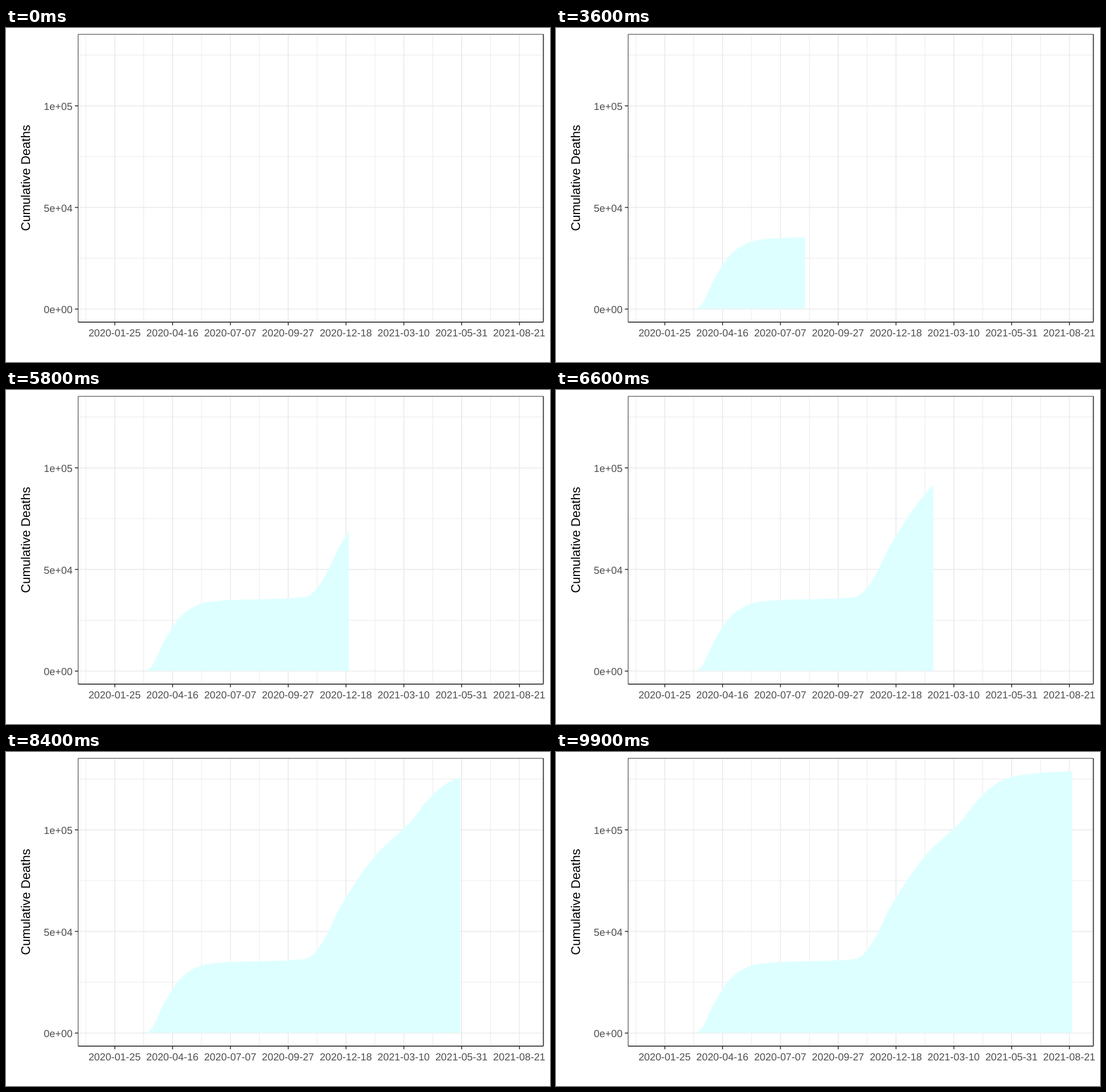
An HTML page for the animation above (10 s loop, 954x587 px).

```html
<!DOCTYPE html>
<html lang="en">
<head>
<meta charset="utf-8">
<title>Cumulative Deaths</title>
<style>
  html, body { margin: 0; width: 100%; height: 100%; overflow: hidden; background: #fff; }
  svg { display: block; width: 100%; height: 100%; }
  text {
    font-family: "Liberation Sans", Arial, sans-serif;
    font-size: 17.9px;
    fill: #4d4d4d;
    text-rendering: geometricPrecision;
  }
  .title { font-size: 22.1px; fill: #000; text-anchor: middle; }
  .major { stroke: #ebebeb; stroke-width: 1.7; }
  .minor { stroke: #ebebeb; stroke-width: 1; }
  .tick { stroke: #333; stroke-width: 1.6; }
  .thin { stroke: #333; stroke-width: 1; }
  .thick { stroke: #333; stroke-width: 1.7; }
  .area { fill: #deffff; }
</style>
</head>
<body>
<svg id="chart" viewBox="0 0 954 587"></svg>
<script>
const LOOP = 10000, STEP = 100, HOLD = 1100;
const LAST_DAY = 600, LAST_STEP = 99;
const box = { left: 126.5, top: 11.1, right: 942.4, bottom: 516.8 };

// Key points of the curve: day, total in hundreds
const keys = [
  [58, 0], [72, 14], [93, 154], [114, 264], [135, 318], [170, 346], [191, 350],
  [254, 356], [275, 360], [303, 386], [324, 493], [338, 595], [359, 716],
  [394, 883], [422, 975], [443, 1046], [464, 1139], [492, 1227], [520, 1265],
  [548, 1278], [600, 1288]
];

const xOf = day => 163.6 + day * 1.2363;
const yOf = hundreds => 494 - hundreds * 0.3572;

const rise = i => (keys[i + 1][1] - keys[i][1]) / (keys[i + 1][0] - keys[i][0]);

// Slope at a key: that of the parabola through it and its neighbours
function slope(i) {
  if (i === 0) return 0;
  if (i === keys.length - 1) return rise(i - 1);
  const before = keys[i][0] - keys[i - 1][0];
  const after = keys[i + 1][0] - keys[i][0];
  return (rise(i - 1) * after + rise(i) * before) / (before + after);
}

// Cubic Hermite curve through the keys
function valueAt(day) {
  let i = 0;
  while (i < keys.length - 2 && day >= keys[i + 1][0]) i++;
  const [x0, y0] = keys[i], [x1, y1] = keys[i + 1];
  const w = x1 - x0, u = (day - x0) / w, v = 1 - u;
  return y0 * v * v * (1 + 2 * u) + y1 * u * u * (1 + 2 * v)
    + w * u * v * (v * slope(i) - u * slope(i + 1));
}

const svg = document.getElementById("chart");

function add(tag, attrs, text) {
  const el = document.createElementNS("http://www.w3.org/2000/svg", tag);
  for (const name in attrs) el.setAttribute(name, attrs[name]);
  if (text) el.textContent = text;
  svg.appendChild(el);
  return el;
}

const line = (cls, x1, y1, x2, y2) => add("line", { class: cls, x1, y1, x2, y2 });
const vLine = (cls, x) => line(cls, x, box.top, x, box.bottom);
const hLine = (cls, y) => line(cls, box.left, y, box.right, y);

const xTicks = Array.from({ length: 8 }, (_, i) => 22 + 82 * i);
const yTicks = [[0, "0e+00"], [500, "5e+04"], [1000, "1e+05"]];

for (const day of xTicks) vLine("minor", xOf(day - 41));
for (const [v] of yTicks) hLine("minor", yOf(v + 250));
for (const day of xTicks) vLine("major", xOf(day));
for (const [v] of yTicks) hLine("major", yOf(v));

const area = add("path", { class: "area" });

vLine("thin", box.left);
hLine("thin", box.top);
vLine("thick", box.right);
hLine("thick", box.bottom);

for (const day of xTicks) {
  const x = xOf(day);
  const date = new Date(Date.UTC(2020, 0, 3 + day)).toISOString().slice(0, 10);
  line("tick", x, box.bottom, x, 522.4);
  add("text", { x: x - 0.4, y: 542.3, "text-anchor": "middle" }, date);
}
for (const [v, label] of yTicks) {
  const y = yOf(v);
  line("tick", 120.8, y, box.left, y);
  add("text", { x: 116.6, y: y + 7.4, "text-anchor": "end" }, label);
}
add("text", { class: "title", transform: "translate(41.6 263.5) rotate(-90)" }, "Cumulative Deaths");

function areaPath(end) {
  const base = yOf(0) - 0.5;
  let d = `M${xOf(keys[0][0])} ${base}`;
  for (let day = keys[0][0]; day <= end; day++) {
    d += `L${xOf(day).toFixed(2)} ${Math.min(base, yOf(valueAt(day))).toFixed(2)}`;
  }
  return d + `V${base}Z`;
}

let shown = -1;
function draw(now) {
  const t = now % LOOP;
  const step = Math.floor(t / STEP);
  if (step === shown) return;
  shown = step;
  // The reveal moves on by whole days
  const day = Math.min(LAST_DAY, Math.floor((step + 0.5) * LAST_DAY / LAST_STEP));
  area.setAttribute("d", t < HOLD ? "" : areaPath(day));
}

const start = performance.now();
function tick() {
  draw(performance.now() - start);
  requestAnimationFrame(tick);
}
tick();
</script>
</body>
</html>
```
